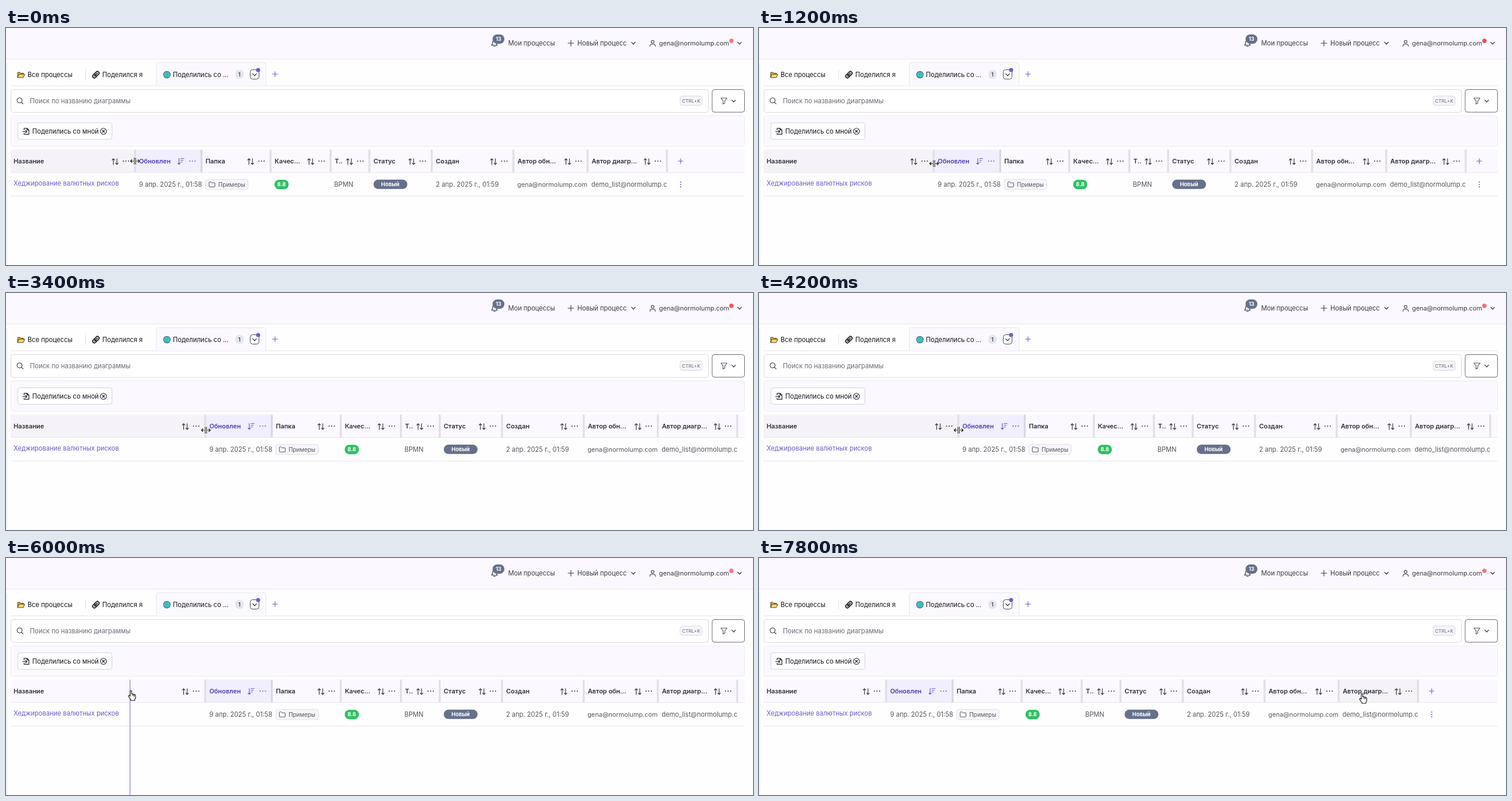
Animation, 1280 px wide and 406 px high, one loop 8 s. Source, as an HTML page:

```html
<!DOCTYPE html>
<html lang="ru">
<head>
<meta charset="utf-8">
<title>Ширина столбцов</title>
<style>
html, body { margin: 0; width: 100%; height: 100%; overflow: hidden; background: #fefefe; }
svg { display: block; width: 100%; height: 100%; }
text { font-family: Inter, "Noto Sans", sans-serif; white-space: pre; }
</style>
</head>
<body>
<svg id="stage" viewBox="0 0 1280 406"></svg>
<script>
const INK = '#3a3b47', HEAD = '#2d2e3e', CELL = '#55565f', SLATE = '#66708c';
const VIOLET = '#6a5fc8', PANEL = '#fbf9ff', LINE = '#e8e6ee';
const LOOP = 8000, STEP = 200;

const text = (s, x, y, { size = 11.1, fill = INK, weight = 400, anchor = 'start' } = {}) =>
  `<text x="${x}" y="${y}" font-size="${size}" fill="${fill}" font-weight="${weight}" text-anchor="${anchor}">${s}</text>`;
const title = (s, x, fill = HEAD) => text(s, x, 232.4, { size: 10.9, weight: 600, fill });
const box = (x, y, w, h, fill, stroke = 'none', r = 0) =>
  `<rect x="${x}" y="${y}" width="${w}" height="${h}" rx="${r}" fill="${fill}" stroke="${stroke}"/>`;
const dot = (x, y, r, fill) => `<circle cx="${x}" cy="${y}" r="${r}" fill="${fill}"/>`;
const icon = (x, y, d, stroke = INK, width = 1.1, fill = 'none') =>
  `<path transform="translate(${x} ${y})" d="${d}" fill="${fill}" stroke="${stroke}" stroke-width="${width}" stroke-linecap="round" stroke-linejoin="round"/>`;
const chevron = (x, y) => icon(x, y, 'M-3.2-1.6L0 1.7L3.2-1.6', INK, 1.3);
const plus = (x, y, r, color) => icon(x, y, `M${-r} 0H${r}M0 ${-r}V${r}`, color);
const sortIcon = x => icon(x, 228.8, 'M-3 5V-5M-5.3-2.6L-3-5L-.7-2.6M3-5V5M.7 2.6L3 5L5.3 2.6', INK, 1.2);
const descIcon = x => icon(x, 228.5, 'M-3-5V5M-5 3L-3 5L-1 3M0-5H5.5M0-2H4M0 1H2.5', VIOLET, 1.2);
const dots = (x, color) => [-4.5, 0, 4.5].map(d => dot(x + d, 228, 1, color)).join('');
const FOLDER = 'M-5-3.6Q-5-4.3-4.3-4.3H-1.6L-.2-2.8H4.3Q5-2.8 5-2.1V3.6Q5 4.3 4.3 4.3H-4.3Q-5 4.3-5 3.6Z';

// Right edges of the columns at zero offset
const edges = [221, 335, 453.3, 556.3, 622.7, 729.5, 869.5, 996.5, 1132.5];
const titles = ['Название', 'Обновлен', 'Папка', 'Качес...', 'Т..', 'Статус', 'Создан', 'Автор обн...', 'Автор диагр...'];

const topBar = () =>
  box(0, 0, 1280, 52.5, PANEL) + box(0, 52.5, 1280, 1, LINE) + box(1, 60, 1, 346, '#ebe9f1') +
  icon(837, 26.5, 'M-4.8 3Q-3.4 1.5-3.4-1.2A3.4 3.4 0 0 1 3.4-1.2Q3.4 1.5 4.8 3ZM-1.6 5H1.6', INK, 1.2) +
  box(833.7, 11, 20.3, 16, SLATE, 'none', 8) +
  text('13', 844, 22.2, { size: 8.8, fill: '#fff', weight: 700, anchor: 'middle' }) +
  text('Мои процессы', 860.5, 30) + plus(968, 26, 5, INK) +
  text('Новый процесс', 979, 30) + chevron(1075, 26) +
  icon(1108, 26, 'M-2.4-2.4A2.4 2.4 0 1 1 2.4-2.4A2.4 2.4 0 1 1-2.4-2.4M-4.6 5.2Q-4.6 1.8-1.4 1.8H1.4Q4.6 1.8 4.6 5.2') +
  text('gena@normolump.com', 1119, 30, { size: 10.9 }) + chevron(1257, 26) +
  `<circle id="alert" cx="1243" cy="22" r="3.7" fill="#fa4148"/>`;

const tabs = () =>
  box(8, 98.5, 1258, 1, LINE) +
  `<path d="M257.5 99V63Q257.5 59.5 261 59.5H442Q445.5 59.5 445.5 63V99" fill="${PANEL}" stroke="${LINE}"/>` +
  icon(25.5, 80, 'M-5.5 4.5V-4H-1.5L0-2.5H4.5V-1', '#4d3a17', 1, '#f2b23b') +
  icon(25.5, 80, 'M-5.5 4.5L-3.2-.8H6.5L4.3 4.5Z', '#4d3a17', 1, '#ffd678') +
  text('Все процессы', 37, 84, { fill: '#17171d' }) + box(136, 71, 1, 17, '#e3e1ea') +
  `<g transform="translate(154 80) rotate(-45)" fill="#b4b4ba" stroke="#26262b" stroke-width="1.5"><rect x="-6.8" y="-3" width="8.4" height="6" rx="3"/><rect x="-1.6" y="-3" width="8.4" height="6" rx="3"/><path d="M-3.5 0H3.5"/></g>` +
  text('Поделился я', 165, 84, { fill: '#17171d' }) +
  dot(275.7, 80, 6.2, '#1d4850') + dot(275.7, 80, 5.4, '#4fd3d4') +
  icon(275.7, 80, 'M-5 0H5M0-5V5M-3.8-2.7H3.8M-3.8 2.7H3.8M0-5Q-5 0 0 5Q5 0 0-5', '#2f9da5', .6) +
  text('Поделились со ...', 286, 84, { fill: '#17171d' }) +
  box(393, 72, 14, 15, '#e2e6ee', 'none', 6) +
  text('1', 400, 83, { size: 9, weight: 600, anchor: 'middle' }) +
  box(418.5, 71.5, 15, 16, '#fff', '#4c4c57', 4) + chevron(426, 80) +
  dot(432, 72, 3.5, VIOLET) + plus(461, 79, 4.2, VIOLET);

const filters = () =>
  box(8.5, 105.5, 1195, 39, '#fff', '#d9d8e0', 4) +
  icon(24, 125, 'M-5-1A4.3 4.3 0 1 1 3.6-1A4.3 4.3 0 1 1-5-1M2.4 2.2L5.3 5') +
  text('Поиск по названию диаграммы', 41, 129.2, { fill: '#6b6c76' }) +
  box(1155, 116.5, 38, 16, '#f7f5fa', '#dcdae3', 4) +
  text('CTRL+K', 1174, 128, { size: 8.2, fill: '#6b6c76', anchor: 'middle' }) +
  box(1210, 105.5, 55.5, 38.7, '#fff', '#6c6c76', 4) +
  icon(1230, 125, 'M-5-5H5.5L1.7-.4V3.5L-1.3 5.3V-.4Z', '#555660') + chevron(1247, 125) +
  box(8.5, 150.5, 1257, 52, PANEL, '#eceaf3', 4) +
  box(20.2, 162.3, 161.3, 28.4, '#fff', '#d3d2db', 4) +
  icon(34.5, 177, 'M-3.5-2V-5.2H1.5L4.8-2V5.2H-3.5V3M1.5-5.2V-2H4.8M-6 .5H1M-1-1.6L1.2 .5L-1 2.6', '#22222b', 1.2) +
  text('Поделились со мной', 45, 181, { fill: '#17171d' }) +
  icon(167, 177, 'M-5.2 0A5.2 5.2 0 1 1 5.2 0A5.2 5.2 0 1 1-5.2 0M-2-2L2 2M-2 2L2-2', '#22222b', 1.1);

const headers = () => edges.map((end, i) => {
  const sorted = i === 1;
  return (i ? title(titles[i], edges[i - 1] + 7, sorted ? '#4b3fb5' : HEAD) : '') +
    (sorted ? descIcon(end - 35.5) : sortIcon(end - 34)) + dots(end - 15.5, sorted ? VIOLET : INK) +
    box(end - 1.7, 208.5, 3.4, 39, sorted ? '#dad7e8' : '#e1dfe7');
}).join('');

const cells = () =>
  text('9 апр. 2025 г., 01:58', 228, 272.3, { fill: CELL }) +
  box(341.8, 259.3, 73, 17.5, '#f8f6fb', '#e2e0e9', 4) + icon(353, 268, FOLDER, CELL, 1) +
  text('Примеры', 363.8, 271.8, { size: 9.9, fill: CELL }) +
  box(460, 260, 24.3, 16.3, '#2fc163', 'none', 8) +
  text('8.8', 472.1, 271.4, { size: 9.2, fill: '#fff', weight: 700, anchor: 'middle' }) +
  text('BPMN', 562.3, 272.3, { fill: CELL }) + box(629.7, 259.8, 58, 16, SLATE, 'none', 8) +
  text('Новый', 658.5, 271.3, { size: 9.3, fill: '#fff', weight: 700, anchor: 'middle' }) +
  text('2 апр. 2025 г., 01:59', 736.5, 272.3, { fill: CELL }) +
  text('gena@normolump.com', 876, 272.3, { size: 10.9, fill: CELL }) +
  `<g clip-path="url(#lastCell)">${text('demo_list@normolump.c', 1003, 272.3, { fill: CELL })}</g>` +
  plus(1156, 228, 4.2, VIOLET) + [264, 268, 272].map(y => dot(1156, y, 1.1, VIOLET)).join('');

const table = () =>
  box(8, 208.5, 1258, 39, PANEL) + box(8, 247, 1258, 1, LINE) + box(8, 287.5, 1258, 1, LINE) +
  `<g clip-path="url(#tableArea)">
    <rect id="hover" y="208.5" height="38.5" fill="#f5f3f7"/>
    <g id="columns">${box(edges[0], 208.5, edges[1] - edges[0], 38.5, '#f1eefd')}${headers()}${cells()}</g>
  </g>` +
  title(titles[0], 13) +
  text('Хеджирование валютных рисков', 13, 269.7, { fill: VIOLET });

const pointers = () =>
  `<rect id="guide" y="208.5" width="1" height="198" fill="#7d6fcb"/>
  <g id="resize">
    ${icon(0, 0, 'M-1.2-6V6M1.2-6V6M-3 0H-7.5M3 0H7.5', '#fff', 2.4)}
    ${icon(0, 0, 'M-3 0H-7.5M3 0H7.5M-5.3-2.3L-7.6 0L-5.3 2.3M5.3-2.3L7.6 0L5.3 2.3', '#111', 1.2)}
    <path id="bars" d="M-1.2-6V6M1.2-6V6" stroke-width="1.1"/>
  </g>
  <g id="hand">${icon(0, 0, 'M-1.2 8V.5Q-1.2-1 0-1T1.2 .5V5Q2.4 4 3.6 5.3Q5 4.6 5.9 6Q8 5.6 8 7.6V11Q8 13 6.6 14.2V16H-.2V14.4Q-2 12.8-4 9.2Q-4.4 7.6-3 7.4Q-2 7.4-1.2 9ZM3.6 5.3V8.3M5.9 6V8.6', '#15151a', 1.1, '#fff')}</g>`;

const stage = document.getElementById('stage');
stage.innerHTML =
  `<defs><clipPath id="tableArea">${box(8, 208, 1258, 80, '#000')}</clipPath>
  <clipPath id="lastCell">${box(997, 250, 136.7, 36, '#000')}</clipPath></defs>` +
  topBar() + tabs() + filters() + table() + pointers();

// [time, pointer x, pointer y, mode, column offset]
const track = [
  [0, 221, 228, 'resize', 0],
  [200, 221, 229, 'resize', 0],
  [400, 234, 231, 'drag', 0],
  [800, 294, 232, 'drag', 0],
  [1000, 300, 232.5, 'resize', 78.3],
  [2600, 300, 231, 'resize', 78.3],
  [2800, 300, 231, 'press', 78.3],
  [3000, 318, 233, 'drag', 78.3],
  [3200, 342, 235, 'drag', 78.3],
  [3400, 342.5, 235, 'resize', 120.4],
  [4400, 342, 235, 'resize', 120.4],
  [5000, 340.8, 228, 'resize', 120.4],
  [5200, 340.8, 228, 'resize', 120.4],
  [5400, 322, 230, 'drag', 120.4],
  [5800, 224, 233, 'drag', 120.4],
  [6000, 214, 228, 'drag', 120.4],
  [6200, 220, 229, 'drag', 120.4],
  [6400, 218.5, 231, 'resize', -3.3],
  [6600, 222, 231, 'hand', -3.3],
  [7200, 905, 230, 'hand', -3.3],
  [7600, 1031, 232, 'hand', -3.3],
  [7800, 1033.3, 233, 'hand', -3.3],
];

function poseAt(t) {
  const i = track.findLastIndex(k => k[0] <= t);
  const a = track[i], b = track[i + 1] || a;
  const u = b === a ? 0 : (t - a[0]) / (b[0] - a[0]);
  return { x: a[1] + (b[1] - a[1]) * u, y: a[2] + (b[2] - a[2]) * u, mode: a[3], shift: a[4] };
}

const part = Object.fromEntries(['alert', 'hover', 'columns', 'guide', 'resize', 'bars', 'hand']
  .map(id => [id, document.getElementById(id)]));
const set = (el, attrs) => Object.entries(attrs).forEach(([k, v]) => el.setAttribute(k, v));
const show = (el, on) => set(el, { visibility: on ? 'visible' : 'hidden' });

function draw(t) {
  const { x, y, mode, shift } = poseAt(t);
  const dragging = mode === 'drag', resizing = mode === 'resize' || mode === 'press';
  const at = `translate(${x} ${y})`;
  set(part.columns, { transform: `translate(${shift} 0)` });

  const column = edges.findIndex(end => x <= end + shift + 1.7);
  const left = column > 0 ? edges[column - 1] + shift : 8;
  set(part.hover, { x: left, width: Math.max(0, edges[Math.max(0, column)] + shift - left) });
  show(part.hover, !dragging && column >= 0);

  set(part.guide, { x: Math.round(x) - 2 });
  show(part.guide, dragging);
  set(part.resize, { transform: at });
  show(part.resize, resizing);
  set(part.bars, { stroke: mode === 'press' ? '#a8434d' : '#222' });
  set(part.hand, { transform: at });
  show(part.hand, !resizing);
  set(part.alert, { opacity: 0.87 - 0.15 * Math.cos((t + 50) / 1000 * Math.PI) });
}

const start = performance.now();
function tick() {
  const t = (performance.now() - start) % LOOP;
  draw(Math.floor(t / STEP) * STEP);
  requestAnimationFrame(tick);
}
draw(0);
tick();
</script>
</body>
</html>
```
